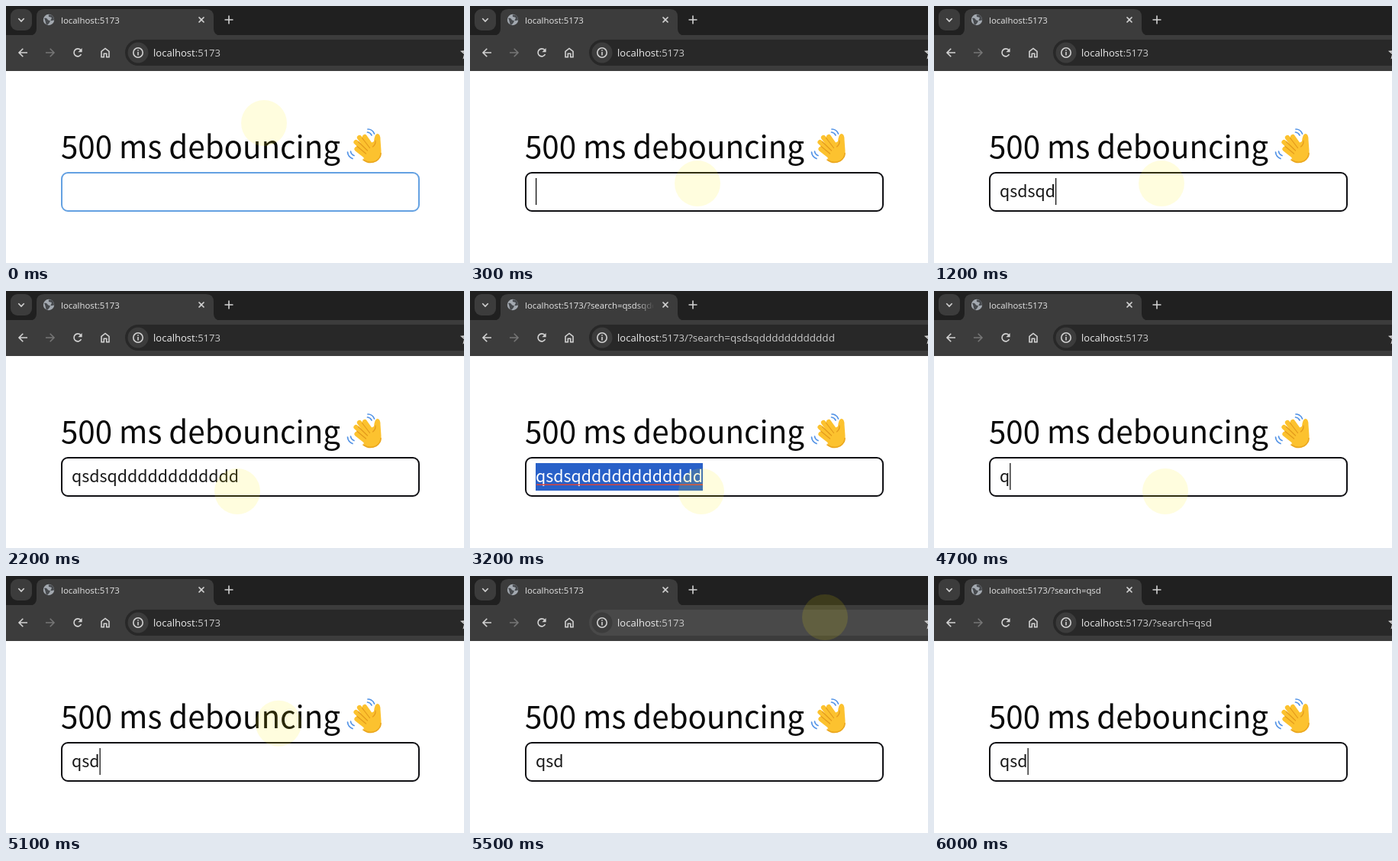
Recreate the animation shown at these times as an HTML page. Size 600x336 px, loop 6400 ms.

```html
<!DOCTYPE html>
<html lang="en">
<head>
<meta charset="utf-8">
<title>Debounced search</title>
<style>
  html, body { margin: 0; width: 100%; height: 100%; overflow: hidden; background: #fff; }
  svg { display: block; width: 600px; height: 336px; }
  text { white-space: pre; }
  .ui { font-family: "Open Sans", "Noto Sans", sans-serif; }
  .page { font-family: "Noto Sans CJK JP", "Noto Sans CJK SC", "Noto Sans CJK", "Noto Sans", sans-serif; }
  .icon { fill: none; stroke: #d2d2d2; stroke-width: 1.6; }
  .round { stroke-linecap: round; stroke-linejoin: round; }
</style>
</head>
<body>
<svg viewBox="0 0 600 336">
  <defs>
    <linearGradient id="fade">
      <stop offset="0" stop-color="#3c3c3c" stop-opacity="0"/>
      <stop offset="1" stop-color="#3c3c3c"/>
    </linearGradient>
    <clipPath id="titleClip"><rect x="70" y="5" width="170" height="28"/></clipPath>
  </defs>

  <!-- tab strip -->
  <rect width="600" height="39" fill="#202020"/>
  <rect x="6" y="4" width="28" height="28" rx="9" fill="#3c3c3c"/>
  <path class="icon" d="M16.3 16.3l3.7 3.7 3.7-3.7" stroke-width="1.8"/>
  <path d="M31 38.5q9 0 9-9V14q0-10 10-10h212q10 0 10 10v15.500q0 9 9 9z" fill="#3c3c3c"/>
  <circle cx="56" cy="18" r="7.200" fill="#a3a9b0"/>
  <path d="M50 16q3-1 4 1t3 2-1 4-4-1-2-6zM56 11.500q-1 3 2 3t1 3 4 1q0-5-4-7z" fill="#474a4e"/>
  <g clip-path="url(#titleClip)">
    <text id="title" class="ui" x="72" y="22.500" font-size="11.400" fill="#e6e6e6"></text>
  </g>
  <rect x="218" y="8" width="24" height="24" fill="url(#fade)"/>
  <path class="icon" d="M252.500 14.500l7 7m0-7l-7 7" stroke="#e0e0e0"/>
  <path class="icon" d="M286.500 18h11M292 12.500v11"/>

  <!-- toolbar -->
  <rect y="38" width="600" height="47" fill="#3c3c3c"/>
  <path class="icon" d="M28 61H17m5.300-5.300L17 61l5.300 5.300"/>
  <path class="icon" d="M52 61h11m-5.300-5.300L63 61l-5.300 5.300" style="stroke:#757575"/>
  <path class="icon" d="M98.500 63.200a5 5 0 1 1-.8-5.800"/>
  <path d="M99.600 55v5.200h-5.200z" fill="#d2d2d2"/>
  <path class="icon" d="M125 59.500v7.300h3.300v-4.600h3.400v4.600h3.300v-7.300l-5-4z"/>
  <rect id="pill" x="156" y="44" width="480" height="34" rx="17"/>
  <circle cx="173" cy="61" r="13.500" fill="#3c3c3c"/>
  <circle class="icon" cx="173" cy="61" r="6.200" stroke-width="1.500"/>
  <path class="icon" d="M173 60v4.500M173 57.200v1.600"/>
  <text class="ui" y="66" font-size="13.050" fill="#ececec" x="193">localhost<tspan fill="#c9c9c9">:5173</tspan><tspan id="path" font-size="13.500" fill="#c9c9c9"></tspan></text>
  <path class="icon" d="M604 54.500l2 4.500 5 .4-4 3.300 1.300 5-4.300-2.700-4.300 2.700 1.300-5-4-3.300 5-.4z"/>

  <!-- page -->
  <rect y="85" width="600" height="251" fill="#fff"/>
  <text class="page" x="72" y="199" font-size="40.300" fill="#0a0a0a">500 ms debouncing</text>

  <!-- waving hand -->
  <g class="round" fill="none">
    <path d="M474 161q6 0 8.500 6M473.500 165q4 .5 5.500 4M447.500 191q.5 6 6.500 8.500M451.500 190q.5 4 4.500 5.500" stroke="#5192e6" stroke-width="1.700"/>
    <path d="M470 171l12 17M463 172l14 18M458.500 178l16 15M459.500 187l14 11" stroke="#fcc22f" stroke-width="6.200"/>
    <path d="M471 183l11-6q1-10 4.500-10 4 0 4 8l1 14q1 10-7 14-9 5-16-3z" fill="#fcc22f"/>
    <path d="M466.500 172.500l10 13M461.500 177.500l12 11.500M460 183.500l11.500 9.500M480.500 184q4-3 3.500-8" stroke="#e39a1c" stroke-width="1.200"/>
    <path d="M468 201q8 6 17 1.500 6-4 6-10" stroke="#eba71f" stroke-width="1.600"/>
  </g>

  <rect id="field" x="73" y="218" width="468" height="50" rx="8" fill="#fff" stroke-width="2"/>
  <rect id="selection" x="86" y="225" height="36" fill="#2860c8"/>
  <text id="value" class="page" x="86" y="250" font-size="21.400"></text>
  <rect id="spell" x="87" y="252.500" height="1.500" fill="#d8443c"/>
  <rect id="caret" y="225" width="1.200" height="35" fill="#000"/>

  <circle id="pointer" r="30" fill="rgb(255,235,0)" fill-opacity=".13"/>
</svg>
<script>
  const LOOP = 6400, STEP = 100;
  const $ = id => document.getElementById(id);
  const [title, path, pill, field, selection, value, spell, caret, pointer] =
    ["title", "path", "pill", "field", "selection", "value", "spell", "caret", "pointer"].map($);

  const word = n => "qsdsq" + "d".repeat(n);
  const query = text => text && "/?search=" + text;

  const typed = [
    [0, ""], [400, "q"], [500, "qs"], [600, "qsd"], [700, word(0)], [800, word(1)],
    [1300, word(3)], [1400, word(5)], [1500, word(8)], [1600, word(10)], [1700, word(12)],
    [3300, ""], [4700, "q"], [4800, "qsd"]
  ];
  const searched = [[0, ""], [2700, word(12)], [4300, ""], [5800, "qsd"]];
  const caretOff = [[0, 300], [2200, 2700], [2800, 3300], [3800, 4300], [5300, 5800]];
  const moves = [
    [0, 338, 153], [300, 298, 232], [1200, 298, 232], [1400, 303, 262], [4900, 303, 262],
    [5500, 465, 54], [5600, 505, 28], [5700, 548, -2], [5800, 600, -40]
  ];

  const at = (steps, t) => steps.filter(s => s[0] <= t).pop()[1];
  const within = (t, [from, to]) => t >= from && t < to;
  const show = (el, on) => el.setAttribute("visibility", on ? "visible" : "hidden");

  function position(t) {
    const next = moves.findIndex(m => m[0] > t);
    if (next < 0) return moves[moves.length - 1].slice(1);
    const [t0, x0, y0] = moves[next - 1], [t1, x1, y1] = moves[next];
    const k = (t - t0) / (t1 - t0);
    return [x0 + (x1 - x0) * k, y0 + (y1 - y0) * k];
  }

  function draw(t) {
    const text = at(typed, t), selected = within(t, [2800, 3300]);
    value.textContent = text;
    value.setAttribute("fill", selected ? "#fff" : "#161616");
    const width = text ? value.getComputedTextLength() : 0;

    path.textContent = query(at(searched, t));
    // the tab title follows the address one step later
    title.textContent = "localhost:5173" + query(at(searched, Math.max(0, t - STEP)));

    selection.setAttribute("width", width);
    spell.setAttribute("width", Math.max(0, width - 1));
    caret.setAttribute("x", 86 + width);
    show(selection, selected);
    show(spell, within(t, [3200, 3300]));
    show(caret, !caretOff.some(span => within(t, span)));
    field.setAttribute("stroke", t < 300 ? "#64a1e2" : "#101014");

    const [x, y] = position(t);
    pointer.setAttribute("cx", x);
    pointer.setAttribute("cy", y);
    pill.setAttribute("fill", x > 156 && y > 20 && y < 78 ? "#494949" : "#282828");
  }

  const start = performance.now();
  function tick() {
    const t = (performance.now() - start) % LOOP;
    draw(Math.floor(t / STEP) * STEP);
    requestAnimationFrame(tick);
  }
  tick();
</script>
</body>
</html>
```
